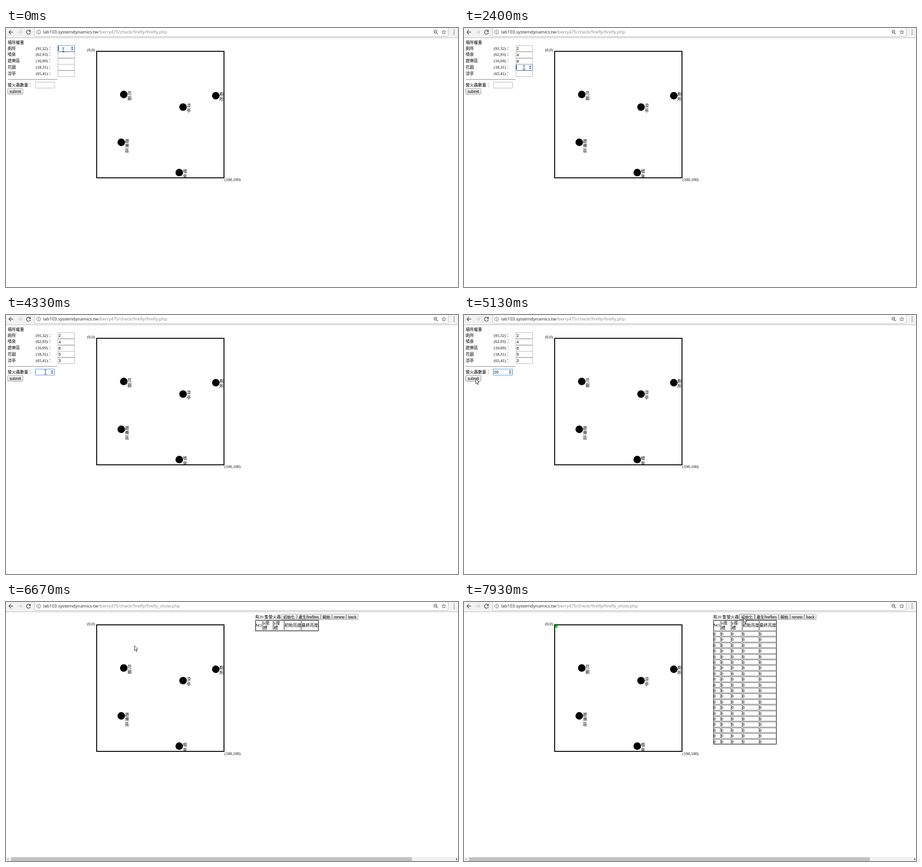
These frames come from a looping animation (987 by 567 pixels, 8 s). An HTML page:

```html
<!DOCTYPE html>
<html lang="zh-Hant">
<head>
<meta charset="utf-8">
<title>Firefly</title>
<style>
html, body { margin: 0; width: 100%; height: 100%; overflow: hidden; background: #fff; }
svg { display: block; position: absolute; left: 0; top: 0; }
text { white-space: pre; font: 9px "Liberation Serif", "Noto Sans CJK TC", serif; }
.ui { font: 8.5px "Liberation Sans", "Noto Sans CJK TC", sans-serif; }
.url { font: 9.6px "Open Sans", "Noto Sans", sans-serif; font-variant-ligatures: none; }
</style>
</head>
<body>
<svg id="stage" width="987" height="567" viewBox="0 0 987 567">
  <defs>
    <linearGradient id="up" x2="0" y2="1"><stop stop-color="#f6f6f6"/><stop offset="1" stop-color="#dcdcdc"/></linearGradient>
    <linearGradient id="hover" x2="0" y2="1"><stop stop-color="#fafafa"/><stop offset="1" stop-color="#e4e4e4"/></linearGradient>
    <linearGradient id="down" x2="0" y2="1"><stop stop-color="#dcdcdc"/><stop offset="1" stop-color="#f0f0f0"/></linearGradient>
  </defs>
  <g id="scene"></g>
</svg>
<script>
const LOOP = 8000, RATE = 0.015, BLINK = 8;
const scene = document.getElementById("scene");

// name, x, y on the 0..100 map
const places = [
  ["廁所", 91, 32], ["噴泉", 62, 93], ["遊樂區", 16, 69], ["花園", 18, 31], ["涼亭", 65, 41]
];
const fields = places.map((p, i) => ({ x: 113.5, y: 38.5 + Math.round(13.75 * i), w: 36, h: 13 }));
fields.push({ x: 64.5, y: 118.5, w: 41, h: 13 });

// step, field, typed value; each entry also moves the focus
const edits = [
  [-2, 0, ""], [12, 0, "2"], [16, 1, ""], [20, 1, "4"], [24, 2, ""], [30, 2, "8"],
  [36, 3, ""], [41, 3, "5"], [46, 4, ""], [49, 4, "3"], [57, 5, ""], [66, 5, "2"], [69, 5, "20"]
];

// step, x, y of the mouse
const path = [
  [0, 125, 48], [12, 125, 48], [13, 126, 50], [15, 131, 59], [20, 131, 59], [23, 131, 73],
  [32, 131, 73], [35, 131, 87], [42, 131, 87], [44, 131, 100], [49, 131, 100], [50, 128, 103],
  [52, 108, 121], [53, 98, 124], [55, 86, 125], [69, 86, 125], [71, 78, 128], [73, 55, 135],
  [75, 33, 139], [77, 25, 139], [93, 25, 139], [95, 34, 141], [97, 95, 133], [100, 280, 95],
  [103, 490, 54], [105, 595, 36], [106, 609, 34], [107, 609.5, 34], [118, 609.5, 34], [119, 610, 34]
];
const PRESS = 85, RELEASE = 87, LOAD = 88, READY = 89, INIT = 112, FILL = 114;

const rect = (x, y, w, h, fill, extra = "") =>
  `<rect x="${x}" y="${y}" width="${w}" height="${h}" fill="${fill}" ${extra}/>`;
const line = (d, color, width = 1, fill = "none", extra = "") =>
  `<path d="${d}" fill="${fill}" stroke="${color}" stroke-width="${width}" ${extra}/>`;
const text = (x, y, s, cls = "", extra = "") => `<text x="${x}" y="${y}" class="${cls}" ${extra}>${s}</text>`;
const inside = (p, r) => p.x >= r.x && p.x <= r.x + r.w && p.y >= r.y && p.y <= r.y + r.h;

function mouseAt(step) {
  const i = path.findIndex(k => k[0] > step);
  if (i < 0) return { x: path.at(-1)[1], y: path.at(-1)[2] };
  const [a, ax, ay] = path[i - 1], [b, bx, by] = path[i];
  const f = (step - a) / (b - a);
  return { x: ax + (bx - ax) * f, y: ay + (by - ay) * f };
}

function toolbar(step) {
  const arrow = (x, dir, color) =>
    line(`M${x - 4.5} 9h9M${x - dir * 0.2} 4.6l${-dir * 4.4} 4.4l${dir * 4.4} 4.4`, color, 1.4);
  const loading = step > PRESS && step < READY;
  const reload = loading
    ? line("M45.5 5.5l7 7M52.5 5.5l-7 7", "#555", 1.4)
    : line("M52.7 6.6A4.4 4.4 0 1 0 53.4 10.2", "#555", 1.4) + `<path d="M54 3.8v4.7h-4.7z" fill="#555"/>`;
  const star = Array.from({ length: 10 }, (_, i) => {
    const r = i % 2 ? 2 : 4.7, a = i * Math.PI / 5;
    return `${956 + r * Math.sin(a)} ${9.3 - r * Math.cos(a)}`;
  }).join("L");
  const file = step < LOAD ? "firefly.php" : "firefly_show.php";
  return rect(0, 0, 987, 21, "#f2f2f2") + rect(0, 21, 987, 1, "#b9b9b9") +
    line("M62.5 -2V16.5q0 2 2 2H963.5q2 0 2-2V-2", "#bdbdbd", 1, "#fff") +
    arrow(11, 1, "#555") + arrow(30, -1, "#cfcfcf") + reload +
    `<circle cx="71.5" cy="9" r="4.3" fill="none" stroke="#5a5a5a"/>` +
    rect(71, 8.2, 1.1, 3.3, "#5a5a5a") + rect(71, 6.2, 1.1, 1.1, "#5a5a5a") +
    text(81, 12.4, "lab103.systemdynamics.tw", "url", 'fill="#222"') +
    text(201.5, 12.4, "/berry475/check/firefly/" + file, "url", 'fill="#868686"') +
    `<circle cx="937.5" cy="8" r="3.1" fill="none" stroke="#555" stroke-width="1.1"/>` +
    line("M936 8h3M940 10.5l3.2 3.2", "#555", 1.1) +
    line(`M${star}Z`, "#555", 0.9) +
    [4.8, 9, 13.2].map(y => `<circle cx="978.5" cy="${y}" r="1.1" fill="#555"/>`).join("");
}

function map(dy) {
  let out = rect(198, 51 + dy, 278, 277, "none", 'stroke="#000" stroke-width="2"') +
    text(177, 51, "(0,0)") + text(477, 335, "(100,100)");
  for (const [name, px, py] of places) {
    const x = 207.6 + 2.753 * px, y = 60 + 2.758 * py + dy;
    out += `<circle cx="${x}" cy="${y}" r="8.2"/>`;
    [...name].forEach((c, i) => { out += text(x + 8, y + 0.2 + 10.9 * i, c); });
  }
  return out;
}

function button(x, y, w, h, label, mouse, pressed, focused) {
  const over = inside(mouse, { x, y, w, h });
  const fill = pressed ? "down" : over ? "hover" : "up";
  const edge = focused ? "#666" : over ? "#8c8c8c" : "#a6a6a6";
  return rect(x + 0.5, y + 0.5, w - 1, h - 1, `url(#${fill})`, `rx="1.5" stroke="${edge}"`) +
    text(x + w / 2, y + h / 2 + 3, label, "ui", 'text-anchor="middle"');
}

function input(f, value, focused, hovered, caret) {
  const mid = f.y + f.h / 2, right = f.x + f.w;
  let out = rect(f.x, f.y, f.w, f.h, "#fff", `stroke="${focused ? "#5a92e6" : "#b4b4b4"}"`);
  if (focused) out += rect(f.x - 0.6, f.y - 0.1, f.w + 1.2, f.h + 0.2, "none", 'rx="1" stroke="#6ea3f0" stroke-opacity=".75" stroke-width="1.2"');
  out += text(f.x + 1.2, mid + 3.2, value, "ui", 'style="font-size:8.9px"');
  if (focused && caret) out += rect(f.x + 0.7 + 4.95 * value.length, mid - 5, 0.9, 10, "#000");
  if (focused || hovered) {
    const x = right - 5;
    out += rect(x - 3.5, f.y + 1.5, 7, f.h - 3, "#f1f1f1") +
      `<path d="M${x - 2.5} ${mid - 1}l2.5-2.8l2.5 2.8zM${x - 2.5} ${mid + 1}l2.5 2.8l2.5-2.8z" fill="#555"/>`;
  }
  return out;
}

function formPage(step, mouse) {
  const values = fields.map(() => "");
  let last;
  for (const e of edits) if (e[0] <= step) { last = e; values[e[1]] = e[2]; }
  const focus = step < PRESS ? last[1] : -1;
  const caret = Math.floor((step - last[0]) / BLINK) % 2 === 0;
  let out = map(0) + text(3.5, 34.8, "場所權重");
  places.forEach(([name, x, y], i) => {
    const base = 47.6 + 13.75 * i;
    out += text(3.5, base, name) + text(65, base, `(${x},${y})：`);
  });
  out += text(4, 115.4, "-".repeat(36)) + text(3.5, 127.6, "螢火蟲數量：");
  fields.forEach((f, i) => { if (i !== focus) out += input(f, values[i], false, inside(mouse, f)); });
  if (focus >= 0) out += input(fields[focus], values[focus], true, false, caret);
  return out + button(3, 132, 34.5, 13.5, "submit", mouse, step >= PRESS && step < RELEASE, step >= PRESS);
}

function table(rows) {
  const cols = [[545, 15], [561, 22], [584, 23], [608, 36], [645, 37]];
  const bevel = (x, y, w, h, a, b) =>
    line(`M${x + 0.5} ${y + h}V${y + 0.5}H${x + w}`, a) + line(`M${x + w - 0.5} ${y + 1}V${y + h - 0.5}H${x + 1}`, b);
  const height = rows ? 273 : 25;
  let out = bevel(544, 39, 139, height, "#777", "#444");
  for (let r = 0; r <= rows; r++) {
    const y = r ? Math.round(64 + 12.4 * (r - 1)) : 40;
    const h = r ? Math.round(64 + 12.4 * r) - y - 1 : 23;
    for (const [x, w] of cols) {
      out += bevel(x, y, w, h, "#555", "#888");
      if (r) out += text(x + 0.6, y + 8.8, "0");
    }
  }
  return out + text(545, 54.2, "NO.") + text(562, 49, "x座") + text(562, 60.2, "標") +
    text(585, 49, "y座") + text(585, 60.2, "標") + text(608.6, 54.2, "初始亮度") + text(645.6, 54.2, "最終亮度");
}

function showPage(step, mouse) {
  const buttons = [[601, 34, "初始化"], [635, 52, "產生fireflies"], [687, 25, "開始"], [712, 31, "renew"], [743, 26.5, "back"]];
  let out = map(-1) + text(544, 36.4, "有20 隻螢火蟲");
  buttons.forEach(([x, w, label], i) => {
    out += button(x, 26, w, 13, label, mouse, !i && step >= INIT && step < FILL, !i && step >= INIT);
  });
  out += table(step >= FILL ? 20 : 0);
  if (step >= FILL) out += rect(199, 51, 5.5, 5.5, "#0f0");
  return out + rect(0, 558, 987, 9, "#f1f1f1") + rect(11, 559, 875, 8, "#c1c1c1") +
    `<path d="M5.5 560.5v5l-3-2.5z" fill="#a3a3a3"/><path d="M983 560.5v5l3-2.5z" fill="#505050"/>`;
}

function pointer(mouse, beam) {
  const shape = beam
    ? line("M-2.5-4.7h2l.5.6l.5-.6h2M0-4.4V4.4M-2.5 4.7h2l.5-.6l.5.6h2", "#222", 0.9)
    : line("M.4.4V11.6L2.9 9.3L4.6 13.3L6.2 12.6L4.5 8.7H7.7Z", "#000", 0.8, "#fff");
  return `<g transform="translate(${mouse.x} ${mouse.y})">${shape}</g>`;
}

let shown = -1;
function draw(now) {
  const step = Math.floor((now % LOOP + 5) * RATE) % (LOOP * RATE);
  if (step !== shown) {
    shown = step;
    const mouse = mouseAt(step), form = step < LOAD;
    const beam = form && fields.some(f => inside(mouse, { x: f.x, y: f.y - 0.5, w: f.w, h: f.h + 1 }));
    scene.innerHTML = (form ? formPage : showPage)(step, mouse) + toolbar(step) + pointer(mouse, beam);
  }
}
const start = performance.now();
function tick() {
  draw(performance.now() - start);
  requestAnimationFrame(tick);
}
tick();
</script>
</body>
</html>
```
